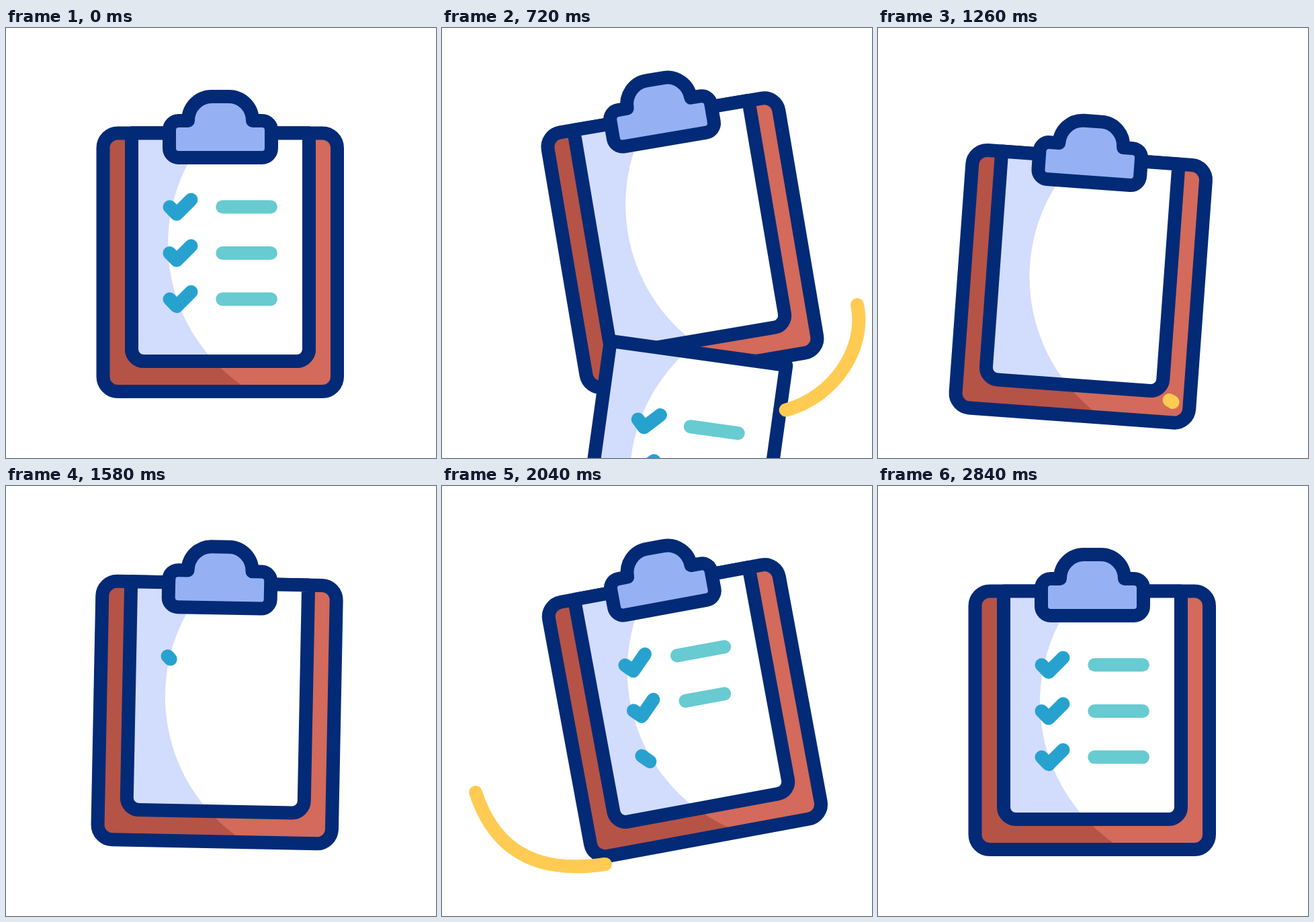
Write an HTML page with a canvas that moves like this. It is 640 by 640 pixels and loops after 3.26 s.

```html
<!DOCTYPE html>
<html lang="en">
<head>
<meta charset="utf-8">
<title>Clipboard</title>
<style>
html, body { margin: 0; width: 100%; height: 100%; overflow: hidden; background: #fff; }
canvas { display: block; width: 640px; height: 640px; }
</style>
</head>
<body>
<canvas id="stage" width="640" height="640"></canvas>
<script>
const ctx = document.getElementById('stage').getContext('2d');
const LOOP = 3260;
const DEG = Math.PI / 180;
const NAVY = '#032a76', YELLOW = '#ffcb52', CHECK = '#27a2cf', LINE = '#67cbd1';
const PIVOT = { x: 319, y: 114 };
const SHEET_TOP = { x: 319, y: 156.5 };
const ROWS = [266.3, 335, 403.6];

// [time, value] pairs, eased from one to the next
const SWING = [[360, 0], [800, -10.5], [1405, 6.6], [1900, -12.3], [2480, 0]];
const BOB = [[160, 0], [740, -26], [1240, 37], [1752, -28.7], [2490, 24], [2660, -56], [2840, 0]];

const SWOOSHES = [
  { path: new Path2D('M618 412C632 478 582 549 514 568C486 575 458 569 432 553'),
    length: 289, head: [500, 840], tail: [840, 1300] },
  { path: new Path2D('M50 456C70 517 115 582 242 563C250 562 258 561 265 559'),
    length: 268, head: [1640, 2130], tail: [2060, 2400] }
];

const board = new Path2D();
board.roundRect(144.5, 156.5, 348.5, 384.5, 22);
const paper = new Path2D();
paper.roundRect(187, 156.5, 264, 339.5, [0, 0, 18, 18]);
const clip = new Path2D('M257 138H271A35 36 0 0 1 306 102H332A35 36 0 0 1 367 138H381' +
  'A14 14 0 0 1 395 152V179A14 14 0 0 1 381 193H257A14 14 0 0 1 243 179V152A14 14 0 0 1 257 138Z');
const light = new Path2D();
light.arc(497, 321.5, 256, 0, Math.PI * 2);

function ease(t, from, to) {
  const u = Math.min(1, Math.max(0, (t - from) / (to - from)));
  return u * u * (3 - 2 * u);
}

function track(keys, t) {
  let value = keys[0][1];
  for (let i = 1; i < keys.length; i++) {
    value += (keys[i][1] - keys[i - 1][1]) * ease(t, keys[i - 1][0], keys[i][0]);
  }
  return value;
}

function place(point, degrees, dx, dy) {
  ctx.translate(point.x + dx, point.y + dy);
  ctx.rotate(degrees * DEG);
  ctx.translate(-point.x, -point.y);
}

function outline(path, color) {
  ctx.strokeStyle = color;
  ctx.stroke(path);
}

function panel(path, shade, lit) {
  ctx.fillStyle = shade;
  ctx.fill(path);
  ctx.save();
  ctx.clip(path);
  ctx.fillStyle = lit;
  ctx.fill(light);
  ctx.restore();
  outline(path, NAVY);
}

function trimmed(path, color, length, start, end) {
  if (end - start < 0.001) return;
  ctx.save();
  if (start > 0 || end < 1) {
    ctx.setLineDash([(end - start) * length, 2000]);
    ctx.lineDashOffset = -start * length;
  }
  outline(path, color);
  ctx.restore();
}

function marks(progress) {
  ROWS.forEach((y, i) => {
    const [check, line] = progress(i);
    trimmed(new Path2D(`M243.5 ${y}l10.5 10.7l21.5 -21.5`), CHECK, 45.4, 0, check);
    trimmed(new Path2D(`M322.3 ${y}h71.6`), LINE, 71.6, 0, line);
  });
}

function fallingSheet(t) {
  const fall = ease(t, 160, 1120);
  ctx.save();
  place(SHEET_TOP, 28 * fall, -7 * fall, 573 * fall);
  panel(paper, '#d2dcfd', '#fff');
  marks(() => [1, 1]);
  ctx.restore();
}

function writtenRow(t, i) {
  const start = 1535 + 215 * i;
  return [ease(t, start, start + 200), ease(t, start + 145, start + 345)];
}

function draw(t) {
  ctx.fillStyle = '#fff';
  ctx.fillRect(0, 0, 640, 640);
  ctx.lineWidth = 20;
  ctx.lineCap = ctx.lineJoin = 'round';

  ctx.save();
  place(PIVOT, track(SWING, t), 0, track(BOB, t));
  panel(board, '#b55347', '#d36a5b');
  panel(paper, '#d2dcfd', '#fff');
  if (t < 1120) fallingSheet(t);
  else marks(i => writtenRow(t, i));
  ctx.fillStyle = '#95b1f3';
  ctx.fill(clip);
  outline(clip, NAVY);
  ctx.restore();

  for (const s of SWOOSHES) {
    trimmed(s.path, YELLOW, s.length, ease(t, ...s.tail), ease(t, ...s.head));
  }
}

function tick() {
  draw(performance.now() % LOOP);
  requestAnimationFrame(tick);
}
tick();
</script>
</body>
</html>
```
